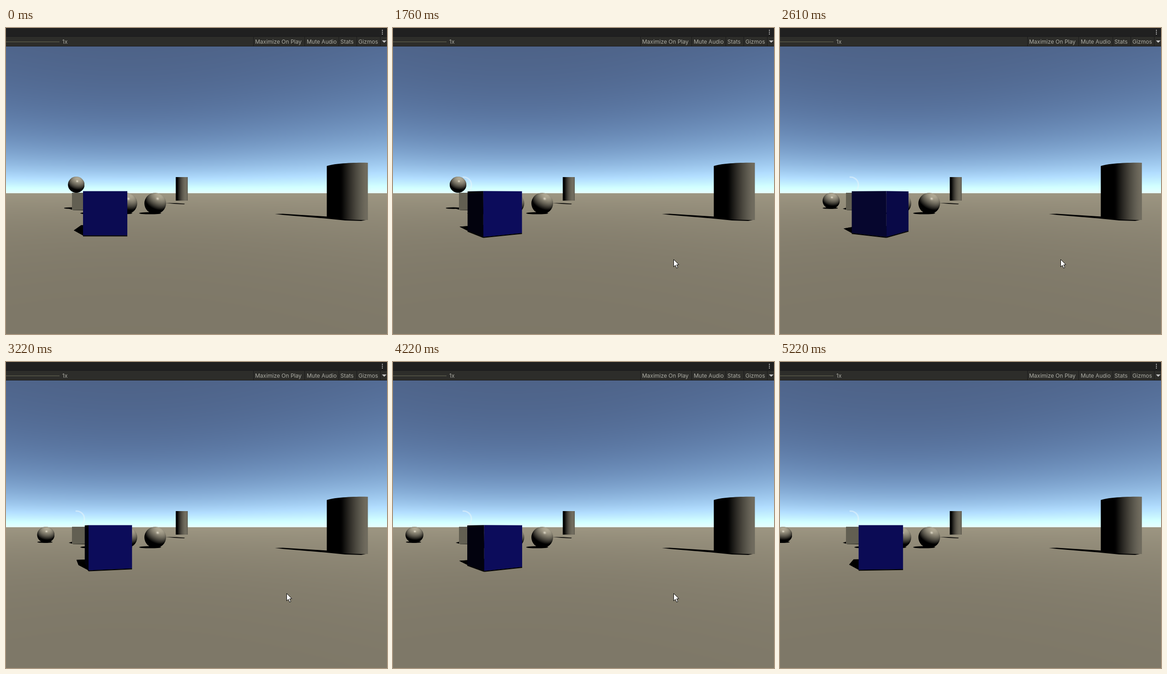
Recreate the animation shown at these times as an HTML page with a canvas. Size 826 px wide and 663 px high, loop 5.3 s.

```html
<!DOCTYPE html>
<html>
<head>
<meta charset="utf-8">
<style>
html, body { margin: 0; width: 100%; height: 100%; overflow: hidden; background: #202020; }
canvas { display: block; }
</style>
</head>
<body>
<canvas id="stage" width="826" height="663"></canvas>
<script>
const W = 826, H = 663, LOOP = 5300, STEP = 76.8;
const CX = 261, HORIZON = 358, FOCAL = 520;        // camera
const EYE = 0.953, CUBE_X = -0.479, CUBE_Z = 5.917; // unit cube standing on the ground
const RAD = Math.PI / 180, SUN_UP = 50 * RAD, SUN_YAW = 30 * RAD;
const ctx = document.getElementById('stage').getContext('2d');

function layer(w, h) {
  const c = document.createElement('canvas');
  c.width = w;
  c.height = h;
  return c.getContext('2d');
}
const backdrop = layer(W, H), sprite = layer(48, 48);

function poly(c, points, fill) {
  c.beginPath();
  points.forEach(p => c.lineTo(p[0], p[1]));
  c.closePath();
  c.fillStyle = fill;
  c.fill();
}

function oval(c, x, y, rx, ry, fill) {
  c.beginPath();
  c.ellipse(x, y, rx, ry, 0, 0, 7);
  c.fillStyle = fill;
  c.fill();
}

const stone = light => [176 * light, 169 * light, 148 * light];

// sun direction as seen along the view ray through column x
function sunYaw(x) {
  return SUN_YAW + Math.atan((x - CX) / FOCAL);
}

function ball(c, x, y, rx, ry) {
  const yaw = sunYaw(x), flat = Math.cos(SUN_UP), size = 48;
  const sun = [flat * Math.sin(yaw), -Math.sin(SUN_UP), flat * Math.cos(yaw)];
  const len = Math.hypot(sun[0], sun[1], sun[2] + 1);
  const img = sprite.createImageData(size, size);
  for (let i = 0; i < size * size; i++) {
    const u = (i % size + .5) * 2 / size - 1, v = (Math.floor(i / size) + .5) * 2 / size - 1;
    const w = Math.sqrt(Math.max(0, 1 - u * u - v * v));
    const lit = Math.max(0, u * sun[0] + v * sun[1] + w * sun[2]);
    const gloss = 70 * Math.pow(Math.max(0, (u * sun[0] + v * sun[1] + w * (sun[2] + 1)) / len), 150);
    img.data.set([...stone(lit).map(k => k + gloss), 255], i * 4);
  }
  sprite.putImageData(img, 0, 0);
  c.save();
  c.beginPath();
  c.ellipse(x, y, rx, ry, 0, 0, 7);
  c.clip();
  c.drawImage(sprite.canvas, x - rx, y - ry, rx * 2, ry * 2);
  c.restore();
}

function cylinderFill(c, x0, x1) {
  const g = c.createLinearGradient(x0, 0, x1, 0), yaw = sunYaw((x0 + x1) / 2);
  for (let i = 0; i <= 24; i++) {
    const lit = Math.cos(SUN_UP) * Math.max(0, Math.cos(Math.asin(i / 12 - 1) - yaw));
    g.addColorStop(i / 24, `rgb(${stone(lit)})`);
  }
  return g;
}

function drawScenery(c) {
  const img = c.createImageData(W, H);
  const fade = (base, gain, e, reach) => base + gain * Math.exp(-e / reach);
  for (let y = 40, i = 40 * W * 4; y < H; y++) {
    for (let x = 0; x < W; x++, i += 4) {
      const e = (HORIZON - y) / Math.hypot(FOCAL, x - CX);
      img.data.set(e > 0
        ? [fade(76, 156, e, .138), fade(95, 183, e, .159), fade(128, 170, e, .2), 255]
        : [fade(125, 32, -e, .138), fade(119, 31, -e, .138), fade(103, 27, -e, .138), 255], i);
    }
  }
  c.putImageData(img, 0, 0);

  // small cylinder
  poly(c, [[345, 379], [370, 379.5], [388, 380.8], [386, 382], [365, 381]], '#000');
  c.fillStyle = cylinderFill(c, 368, 394);
  c.fillRect(368, 323, 26, 51);

  // large cylinder
  poly(c, [[583, 403], [600, 402.5], [696, 408.5], [780, 416], [770, 418], [735, 417], [690, 412.5], [600, 405]], '#000');
  c.beginPath();
  c.moveTo(695.5, 299);
  c.bezierCurveTo(710, 294, 750, 291, 784.5, 292);
  c.lineTo(784.5, 416);
  c.bezierCurveTo(755, 416, 720, 415, 695.5, 412);
  c.fillStyle = cylinderFill(c, 695, 785);
  c.fill();

  for (const x of [196, 261, 323.5]) {
    oval(c, x - 11, 401.3, 24, 2.3, '#000');
    ball(c, x, 380, 23.5, 23);
  }
}

function drawToolbar(c) {
  c.fillStyle = '#202020';
  c.fillRect(0, 0, W, 19);
  c.fillStyle = '#2d2d2a';
  c.fillRect(0, 19, W, 21);
  c.fillStyle = '#1a1a1a';
  c.fillRect(0, 18, W, 1);
  c.fillRect(0, 39, W, 1);
  for (const x of [536, 647, 721, 760, 811]) c.fillRect(x, 19, 1, 20);
  c.fillStyle = '#4e4e42';
  c.fillRect(0, 29, 116, 2);
  c.fillStyle = '#adada5';
  c.font = '12px Inter, Roboto, sans-serif';
  [['1x', 122], ['Maximize On Play', 540], ['Mute Audio', 652], ['Stats', 725], ['Gizmos', 764]]
    .forEach(([label, x]) => c.fillText(label, x, 34));
  poly(c, [[815, 27], [825, 27], [820, 32]], '#c4c4c4');
  for (const y of [4, 8, 12]) c.fillRect(815, y, 2, 2);
}

// creeps off the box, drops, then rolls left at a steady pace
function drawRoller(c, t) {
  const x = t < 2070 ? 152.9 - .55 * Math.exp(1.74 * t / 1000) : 132.6 - .04 * (t - 2070);
  const fall = Math.max(0, t - 1832) / 1000;
  const y = Math.min(374.5, 339.5 + 176 * fall * fall);
  oval(c, x - 2 - (374.5 - y) * .23, 390.3, 16.5, 1.7, '#000');

  // pale rim left in the sky where the ball first rested
  if (t > 900) {
    c.beginPath();
    c.arc(153, 340, 17, -1.7, .7);
    c.strokeStyle = 'rgba(235,245,250,.5)';
    c.lineWidth = 3;
    c.stroke();
  }
  ball(c, x, y, 18 + (152 - x) * .0135, 17.5);
}

function drawFarBox(c) {
  poly(c, [[136, 391.5], [143, 389.5], [180, 390], [180, 395], [146, 394.5]], '#000');
  c.fillStyle = '#625f52';
  c.fillRect(143, 357, 36, 37);
}

function project(p, height) {
  return [CX + p[0] / p[1] * FOCAL, HORIZON + (EYE - height) / p[1] * FOCAL];
}

function drawCube(c, t) {
  const turn = t < 1090 ? 0 : Math.max(-265.3, -81.5 - .0726 * (t - 2070));
  const deg = (turn % 90 + 90) % 90; // all four sides look alike
  const cos = Math.cos(deg * RAD) / 2, sin = Math.sin(deg * RAD) / 2;
  // back left, front left, front right, back right
  const base = [[-cos - sin, cos - sin], [-cos + sin, -cos - sin], [cos + sin, -cos + sin], [cos - sin, cos + sin]]
    .map(p => [p[0] + CUBE_X, p[1] + CUBE_Z]);
  const cast = base.map(p => [p[0] - .37, p[1] + .74]);
  const ground = p => project(p, 0);

  poly(c, cast.map(ground), '#000');
  for (let i = 0; i < 4; i++) {
    const j = (i + 1) % 4;
    poly(c, [base[i], base[j], cast[j], cast[i]].map(ground), '#000');
  }
  for (let i = 0; i < 3; i++) {
    const p = base[i], q = base[i + 1], low0 = ground(p), low1 = ground(q);
    if (low1[0] <= low0[0]) continue; // faces away
    const lit = Math.max(0, Math.cos((deg + (i - 1) * 90 - 24) * RAD));
    const blue = 10 + 82 * Math.pow(lit, 1.5);
    poly(c, [project(p, 1), project(q, 1), low1, low0], `rgb(${blue * .13},${blue * .13},${blue})`);
    c.strokeStyle = '#000';
    c.lineWidth = 2;
    c.beginPath();
    c.moveTo(low0[0], low0[1] + 1);
    c.lineTo(low1[0], low1[1] + 1);
    c.stroke();
  }
}

function drawPointer(c, t) {
  if (t < 140 || t > 4830) return;
  const arrive = Math.min(1, (t - 140) / 360), leave = Math.max(0, t - 4300) / 500;
  const away = Math.pow(1 - arrive, 2), gone = leave * leave;
  c.save();
  c.translate(608.5 + 102 * away + 127 * gone, 501.5 + 110 * away + 165 * gone);
  poly(c, [[0, 0], [0, 16], [3.7, 12.6], [6.3, 18.8], [9, 17.6], [6.4, 11.6], [11.3, 11.3]], '#fff');
  c.strokeStyle = '#000';
  c.lineWidth = 1;
  c.stroke();
  c.restore();
}

drawScenery(backdrop);
drawToolbar(backdrop);

function frame() {
  const t = Math.floor((performance.now() % LOOP + 10) / STEP) * STEP;
  ctx.drawImage(backdrop.canvas, 0, 0);
  drawRoller(ctx, t);
  drawFarBox(ctx);
  drawCube(ctx, t);
  drawPointer(ctx, t);
  requestAnimationFrame(frame);
}
requestAnimationFrame(frame);
</script>
</body>
</html>
```
